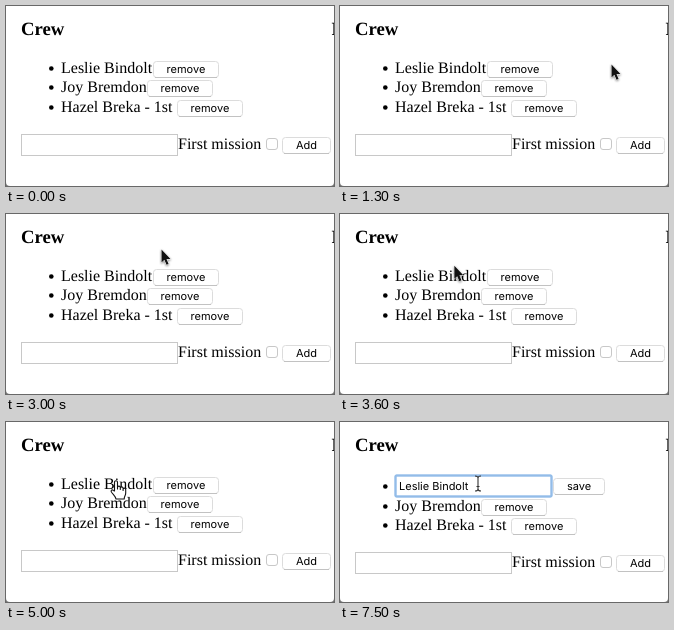
Animation, 328 px wide and 180 px high, one loop 8000 ms. Source, as an HTML page:

```html
<!DOCTYPE html>
<html lang="en">
<head>
<meta charset="utf-8">
<title>Crew list</title>
<style>
  html, body { margin: 0; height: 100%; overflow: hidden; background: #777; }
  svg { display: block; width: 100vw; height: 100vh; }
  text { font: 16px "Liberation Serif", serif; white-space: pre; text-rendering: geometricPrecision; }
  .head { font-size: 18.72px; font-weight: bold; }
  .ui { font: 11px Inter, sans-serif; }
  .mid { text-anchor: middle; }
  .box { fill: #fff; stroke: #c8c8c8; }
  .button { fill: #fff; stroke: #dcdcdc; }
  .shade { stroke: #c2c2c2; }
  .focus { fill: none; stroke: #93bce8; stroke-width: 2; filter: drop-shadow(0 0 .6px #a9cdf3); }
  .ring { fill: none; stroke: #666; stroke-width: 1.5; }
  .arrow { fill: #111; stroke: #fff; stroke-width: 1; paint-order: stroke; filter: drop-shadow(0 1px 1px #0007); }
  .hand { fill: #fff; stroke: #111; stroke-width: 1.1; stroke-linejoin: round; }
  .beam { fill: none; stroke: #333; stroke-width: 1.1; }
</style>
</head>
<body>
<svg id="stage" viewBox="0 0 328 180"></svg>
<script>
const LOOP = 8000, STEP = 100;
const EDIT_AT = 5900, FOCUS_AT = 7000, CARET_OFF = 7500;

// Pointer hot spot: time, x, y
const path = [
  [0, 334, 164], [100, 325, 151], [800, 271, 58], [1900, 271, 58],
  [2300, 245, 44], [2800, 179, 36], [3000, 155, 35], [3700, 108, 54],
  [3800, 109, 55], [4400, 109, 55], [5000, 110, 59], [6500, 110, 59],
  [7000, 138, 61]
];
// Click rings: from, to, x, y, radius
const clicks = [[1200, 1300, 271, 61, 21], [5700, 5900, 110, 59, 30.5]];

const text = (x, y, s, cls = "") => `<text x="${x}" y="${y}" class="${cls}">${s}</text>`;
const rect = (x, y, w, h, cls, r = 0) =>
  `<rect x="${x + .5}" y="${y + .5}" width="${w - 1}" height="${h - 1}" rx="${r}" class="${cls}"/>`;
const button = (x, y, w, label) =>
  rect(x, y, w, 17, "button", 3) +
  `<path class="shade" d="M${x + 2} ${y + 16.5}h${w - 4}"/>` +
  text(x + w / 2, y + 12.3, label, "ui mid");
const bullet = y => `<circle cx="45.3" cy="${y - 4.5}" r="2.3"/>`;
const row = (baseline, name, buttonX) => {
  const y = Math.round(baseline);
  return bullet(y) + text(55, y, name) + button(buttonX, y - 12, 66, "remove");
};
const form = y =>
  rect(15, y, 157, 22, "box") +
  text(172, y + 15, "First mission") +
  rect(260, y + 4, 12, 12, "box", 2.5) +
  button(276, y + 3, 49, "Add");
// Everything under the first list row
const below = shift =>
  row(86.4 + shift, "Joy Bremdon", 141) +
  row(105.6 + shift, "Hazel Breka - 1st", 171) +
  form(Math.round(128 + shift));
const group = (id, body) => `<g id="${id}">${body}</g>`;

stage.innerHTML =
  `<path fill="#fff" d="M0 0H328V176a4 4 0 0 1-4 4H4a4 4 0 0 1-4-4z"/>` +
  text(15, 29, "Crew", "head") + text(325.5, 29, "F", "head") +
  group("reading", row(67, "Leslie Bindolt", 147) + below(0)) +
  group("editing",
    bullet(69) + rect(55, 53, 157, 22, "box") +
    group("focusRing", rect(55, 53, 157, 22, "focus", 1)) +
    text(59, 68, "Leslie Bindolt", "ui") +
    group("caret", `<path d="M129 57h1v14h-1z"/>`) +
    button(213, 56, 52, "save") + below(2.2)) +
  `<circle id="ring" class="ring"/>` +
  group("pointer",
    `<path id="arrow" class="arrow" d="M.5.5V13.5L3.4 10.8 5.5 15.8 7.6 14.9 5.5 10H9.5z"/>` +
    `<path id="hand" class="hand" d="M-1.5 10V1.3a1.5 1.5 0 0 1 3 0V8V6.5a1.4 1.4 0 0 1 2.8 0V8.5V7.3
      a1.4 1.4 0 0 1 2.8 0V9.5V8.4a1.3 1.3 0 0 1 2.6 0V12c0 2.5-1.5 3-1.5 6H0
      c0-2-2.5-4-4.5-6.8c-1.2-1.8.6-3 1.8-1.8z"/>` +
    `<path id="beam" class="beam" d="M-3-7q3 0 3 2q0-2 3-2M0-5V6M-3 8q3 0 3-2q0 2 3 2M-1.5 3.5h3"/>`);

const el = id => document.getElementById(id);
const show = (id, on) => el(id).setAttribute("display", on ? "inline" : "none");

// Slope at a key; zero where the pointer rests
function slope(i, axis) {
  const a = path[i - 1], b = path[i], c = path[i + 1];
  if (!a || !c || a[1] === b[1] || b[1] === c[1]) return 0;
  return (c[axis] - a[axis]) / (c[0] - a[0]);
}

function pointerAt(t, axis) {
  const i = path.findIndex(key => key[0] > t) - 1;
  if (i < 0) return path[path.length - 1][axis];
  const a = path[i], b = path[i + 1], d = b[0] - a[0], u = (t - a[0]) / d;
  const blend = u * u * (3 - 2 * u);
  return a[axis] + (b[axis] - a[axis]) * blend +
    d * u * (1 - u) * ((1 - u) * slope(i, axis) - u * slope(i + 1, axis));
}

function draw(t) {
  const edit = t >= EDIT_AT;
  show("reading", !edit);
  show("editing", edit);
  show("focusRing", t >= FOCUS_AT);
  show("caret", t >= FOCUS_AT && t < CARET_OFF);

  show("pointer", t >= 100);
  show("arrow", t < 3800);
  show("hand", t >= 3800 && !edit);
  show("beam", edit);
  el("pointer").setAttribute("transform", `translate(${pointerAt(t, 1)} ${pointerAt(t, 2)})`);

  const click = clicks.find(([from, to]) => t >= from && t < to);
  show("ring", click);
  if (click) ["cx", "cy", "r"].forEach((name, i) => el("ring").setAttribute(name, click[i + 2]));
}

const start = performance.now();
function tick() {
  const t = (performance.now() - start) % LOOP;
  draw(Math.floor(t / STEP) * STEP);
  requestAnimationFrame(tick);
}
tick();
</script>
</body>
</html>
```
